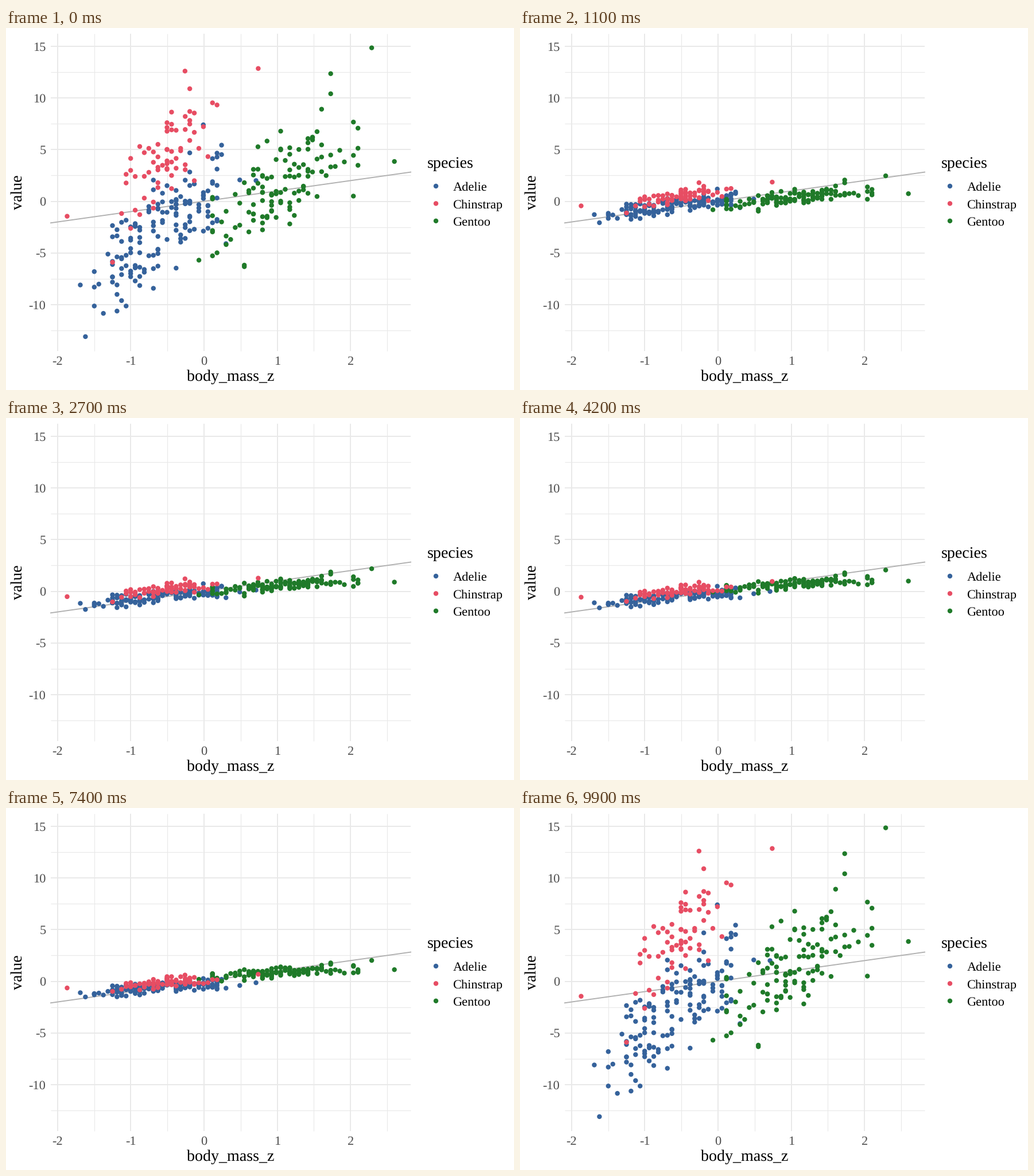
These frames come from a looping animation (885x632 px, 10 s). A matplotlib script:

```python
import numpy as np
import matplotlib
import matplotlib.pyplot as plt
from matplotlib.animation import FuncAnimation

W, H, DPI = 885, 632, 100
PT = 72 / DPI                       # points per pixel
FRAMES, STEP, STATES = 100, 11, 9   # frames per loop and per transition
BLUE, PINK, GREEN = "#35629B", "#E74D63", "#1F7A29"

matplotlib.rcParams.update({"font.family": "Liberation Serif", "text.hinting": "none"})
rng = np.random.default_rng(12)

# Weights of (bill length, bill depth, flipper length), before any fitting
START = np.array([3.05, 3.53, 3.08])
SLOPE = np.array([.55, .64, .50])   # feature change per unit of mass
NOISE = np.array([.45, .45, .38])


def weights(state):
    """Weights after each fitting step; the last state returns to the start."""
    if state % STATES == 0:
        return START
    k = state - 1
    fade = np.exp(-k / 2.4)
    return np.array([.07 + .26 * fade, .05 + .52 * fade, .67 + .02 * k])


def snap(z):
    """Round a standardised mass to a whole 50 g."""
    mean, sd = 4207, 805.2
    return (np.round((z * sd + mean) / 50) * 50 - mean) / sd


def flock(count, masses, middle, features, extremes):
    """Masses and body features of one species, with a few extreme birds."""
    x = snap(rng.triangular(*masses, count))
    edge, value = np.array(extremes).T
    n = len(edge)
    x[:n] = edge
    body = features + np.outer(x - middle, SLOPE)
    body[n:] += NOISE * rng.normal(size=(count - n, 3)).clip(-1.7, 1.7)
    # Move the extreme birds to their known first value the likeliest way
    pull = NOISE ** 2 * START
    body[:n] += np.outer((value - body[:n] @ START) / (pull @ START), pull)
    return x, body


flocks = [
    (BLUE, flock(151, (-1.6, -.75, .6), -.63, (-.945, .60, -.78),
                 [(-1.62, -13.1), (-1.69, -8.1), (-.01, 7.4), (.71, 2.0), (.3, -4.1)])),
    (GREEN, flock(123, (-.1, .8, 2.25), 1.09, (.656, -1.10, 1.16),
                  [(2.29, 14.85), (2.6, 3.85), (1.73, 12.35), (2.04, .5), (-.07, -5.7)])),
    (PINK, flock(68, (-1.25, -.6, .3), -.585, (.897, .645, -.36),
                 [(-1.87, -1.45), (.74, 12.85), (-.26, 12.6), (-1.25, -5.9)])),
]
mass = np.concatenate([x for _, (x, _) in flocks])
body = np.concatenate([b for _, (_, b) in flocks])
colors = [c for c, (x, _) in flocks for _ in x]

fig = plt.figure(figsize=(W / DPI, H / DPI), dpi=DPI, facecolor="white")
page = fig.add_axes([0, 0, 1, 1], xlim=(0, W), ylim=(H, 0))
page.axis("off")

LEFT, RIGHT, TOP, BOTTOM = 78, 705, 10, 564
X0, Y0, SX, SY = 345, 302.5, 127.55, 18.04


def px(x):
    return X0 + SX * np.asarray(x)


def py(y):
    return Y0 - SY * np.asarray(y)


def grid(xs, ys, width):
    style = dict(color="#E9E9E9", lw=width * PT, zorder=1)
    page.vlines(px(xs), TOP, BOTTOM, **style)
    page.hlines(py(ys), LEFT, RIGHT, **style)


def label(x, y, s, size, color="black", ha="left", **kw):
    page.text(x, y, s, size=size * PT, color=color, ha=ha, va="baseline", **kw)


xticks, yticks = np.arange(-2, 3), np.arange(-10, 16, 5)
grid(np.arange(-1.5, 3), np.arange(-12.5, 13, 5), 1.1)
grid(xticks, yticks, 2)

ends = np.array([LEFT, RIGHT])
page.plot(ends, py((ends - X0) / SX), color="#B0B0B0", lw=1.9 * PT, zorder=2)

BIG, SMALL = 28, 22.4
for t in xticks:
    label(px(t), 588, str(t), SMALL, "#4D4D4D", ha="center")
for t in yticks:
    label(69.5, py(t) + 7.5, str(t), SMALL, "#4D4D4D", ha="right")
label(391.5, 616, "body_mass_z", BIG, ha="center")
label(27.5, 287, "value", BIG, ha="center", rotation=90, rotation_mode="anchor")

label(734, 244, "species", BIG)
DOT = (8.4 * PT) ** 2
rows = 276 + 30.4 * np.arange(3)
for name, y in zip(("Adelie", "Chinstrap", "Gentoo"), rows):
    label(778.5, y + 7.5, name, SMALL)
page.scatter([749] * 3, rows, s=DOT, c=[BLUE, PINK, GREEN], lw=0, zorder=3)

dots = page.scatter(px(mass), py(mass), s=DOT, c=colors, lw=0, zorder=3)


def update(i):
    state, part = divmod(i, STEP)
    t = part / STEP
    beta = (1 - t) * weights(state) + t * weights(state + 1)
    dots.set_offsets(np.c_[px(mass), py(body @ beta)])
    return dots,


anim = FuncAnimation(fig, update, frames=FRAMES, interval=100, repeat=True,
                     repeat_delay=0, blit=False)
plt.show()
```
